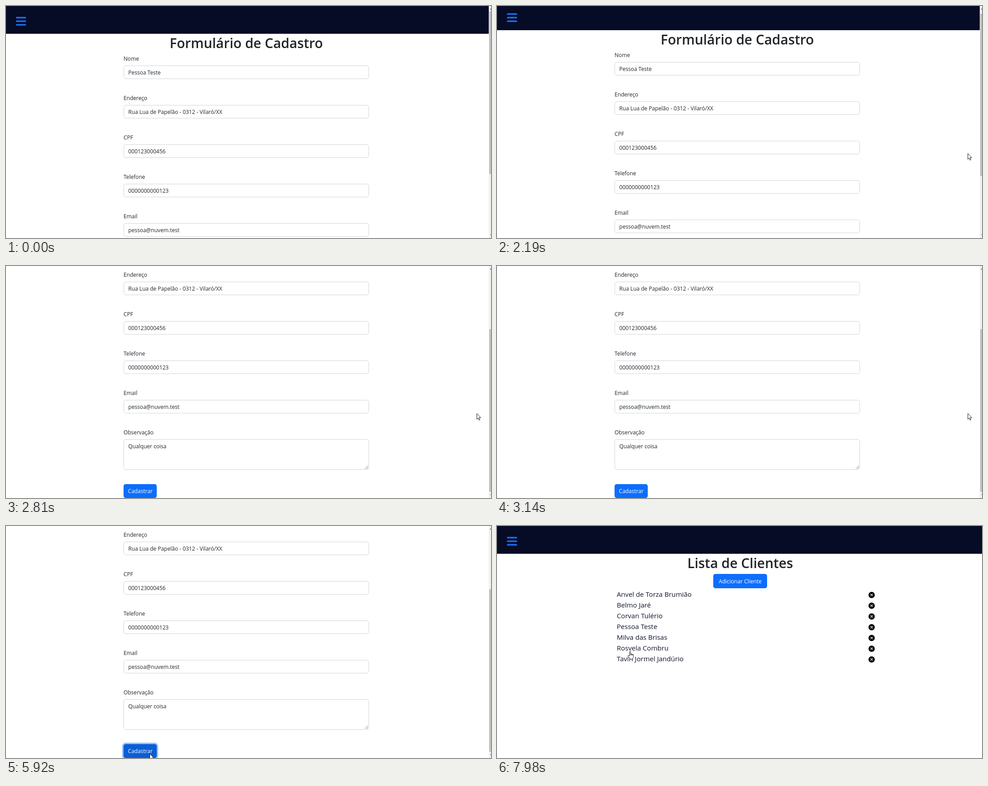
Recreate the animation shown at these times as an HTML page. Size 1081 px wide and 518 px high, loop 8 s.

```html
<!DOCTYPE html>
<html lang="pt-BR">
<head>
<meta charset="utf-8">
<title>Cadastro</title>
<style>
  * { box-sizing: border-box; margin: 0; }
  html, body { width: 100%; height: 100%; overflow: hidden; background: #fff; }
  body {
    position: relative;
    font: 12.1px/19.2px "Open Sans", "Noto Sans", sans-serif;
    color: #212529;
  }
  .view, .page, .cursor { position: absolute; left: 0; top: 0; }
  .view { width: 1081px; height: 518px; overflow: hidden; }
  .view, .page, .thumb, .rows, .cursor, .arrow, .hand {
    animation: 8s step-end infinite;
  }

  nav { height: 62.4px; padding: 24.4px 0 0 22px; background: #060b26; }
  nav svg { display: block; }
  h1 {
    position: relative;
    top: 1.5px;
    height: 38.4px;
    margin-bottom: 6.4px;
    font-size: 30px;
    line-height: 38.4px;
    font-weight: 600;
    text-align: center;
  }
  .btn {
    border-radius: 4.8px;
    background: #0d6efd;
    color: #fff;
    text-align: center;
  }

  /* Form */
  .form { animation-name: form; }
  .page { width: 1076px; animation-name: scroll; }
  .page h1 { width: 1071px; }
  .fields { width: 547px; margin-left: 262px; }
  .fields label { display: block; height: 19.2px; margin-bottom: 6.4px; padding-top: .6px; }
  .box {
    position: relative;
    height: 30.4px;
    margin-bottom: 32px;
    padding: 5.4px 9.6px;
    border: 1px solid #ced4da;
    border-radius: 4.8px;
    white-space: nowrap;
  }
  .area { height: 68.8px; }
  .area svg { position: absolute; right: 0; bottom: 0; }
  .send {
    width: 74.4px;
    height: 30.4px;
    padding-top: 6.1px;
    animation: send 8s linear infinite;
  }
  .bar { position: absolute; left: 1076px; top: 0; width: 5px; height: 518px; background: #f1f1f1; }
  .bar::before, .bar::after {
    content: "";
    position: absolute;
    left: 3px;
    width: 2px;
    height: 1.5px;
    background: #606060;
  }
  .bar::before { top: 6px; }
  .bar::after { top: 509.5px; }
  .thumb {
    position: absolute;
    left: 1px;
    top: 12px;
    width: 4px;
    height: 363px;
    background: #c1c1c1;
    animation-name: thumb;
  }

  /* List */
  .list { animation-name: list; }
  .list h1 { width: 1084px; }
  .add { width: 120px; height: 32px; margin-left: 482px; padding-top: 7px; }
  .rows {
    width: 576px;
    margin-left: 267px;
    padding: 0;
    list-style: none;
    font-size: 15.1px;
    line-height: 24px;
    color: #10142a;
    animation-name: rows;
  }
  .rows li { position: relative; height: 24px; padding-top: .7px; }
  .rows svg { position: absolute; right: 1px; top: 7.5px; }

  /* Pointer */
  .cursor { width: 0; height: 0; animation-name: move; }
  .cursor svg { position: absolute; overflow: visible; fill: #fff; stroke: #000; stroke-width: .9; stroke-linejoin: round; }
  .arrow { animation-name: arrow; }
  .hand { animation-name: hand; }

  @keyframes form { 0% { visibility: visible; } 74.875%, 100% { visibility: hidden; } }
  @keyframes list { 0% { visibility: hidden; } 74.875%, 100% { visibility: visible; } }
  @keyframes rows { 0% { opacity: 0; } 78.25%, 100% { opacity: 1; } }
  @keyframes arrow { 0% { opacity: 1; } 99%, 100% { opacity: 0; } }
  @keyframes hand { 0% { opacity: 0; } 99%, 100% { opacity: 1; } }

  @keyframes scroll {
    0% { transform: none; }
    27.375% { transform: translateY(-8px); }
    28.25% { transform: translateY(-38px); }
    29.125% { transform: translateY(-74px); }
    30% { transform: translateY(-110px); }
    30.875% { transform: translateY(-141px); }
    31.75% { transform: translateY(-172px); }
    32.625%, 100% { transform: translateY(-186px); }
  }
  @keyframes thumb {
    0% { transform: none; }
    27.375% { transform: translateY(5px); }
    28.25% { transform: translateY(26px); }
    29.125% { transform: translateY(51px); }
    30% { transform: translateY(76px); }
    30.875% { transform: translateY(98px); }
    31.75% { transform: translateY(119px); }
    32.625%, 100% { transform: translateY(129px); }
  }
  @keyframes send {
    0%, 61.5% { background: #0d6efd; box-shadow: 0 0 0 3.2px #3184fd00; }
    63.375%, 67.25% { background: #0b5ed7; box-shadow: 0 0 0 3.2px #3184fd00; }
    69% { background: #0a58ca; box-shadow: 0 0 0 3.2px #3184fd80; }
    71%, 100% { background: #0b5ed7; box-shadow: 0 0 0 3.2px #3184fd80; }
  }
  @keyframes move {
    0% { visibility: hidden; transform: translate(1037px, 486px); }
    12.25% { visibility: visible; transform: translate(1037px, 486px); }
    13.125% { transform: translate(1040px, 440px); }
    14% { transform: translate(1045px, 395px); }
    14.875% { transform: translate(1048px, 360px); }
    15.75% { transform: translate(1049px, 340px); }
    16.5% { transform: translate(1049px, 329px); }
    49.25% { transform: translate(930px, 350px); }
    50.125% { transform: translate(760px, 405px); }
    51% { transform: translate(610px, 455px); }
    51.875% { transform: translate(544px, 475px); }
    56.25% { transform: translate(535px, 476px); }
    57.125% { transform: translate(508px, 480px); }
    58% { transform: translate(470px, 485px); }
    58.875% { transform: translate(428px, 491px); }
    59.75% { transform: translate(390px, 497px); }
    60.625% { transform: translate(358px, 502px); }
    61.5% { transform: translate(335px, 506px); }
    62.375% { transform: translate(324px, 507px); }
    63.125% { transform: translate(320px, 508px); }
    96.375% { transform: translate(318px, 480px); }
    97.25% { transform: translate(313px, 425px); }
    98.125% { transform: translate(306px, 360px); }
    99% { transform: translate(299px, 302px); }
    99.75%, 100% { visibility: visible; transform: translate(297px, 279px); }
  }
</style>
</head>
<body>
  <svg width="0" height="0" style="position:absolute">
    <defs>
      <g id="menu" stroke="#1a6fef" stroke-width="3.6" stroke-linecap="round">
        <path d="M1.8 2H21.2M1.8 10H21.2M1.8 18H21.2"/>
      </g>
      <g id="close">
        <circle cx="7" cy="7" r="7"/>
        <path d="M4.9 4.9l4.2 4.2M9.1 4.9l-4.2 4.2" stroke="#fff" stroke-width="1.4" stroke-linecap="round"/>
      </g>
    </defs>
  </svg>

  <section class="view form">
    <div class="page">
      <nav><svg width="23" height="20"><use href="#menu"/></svg></nav>
      <h1>Formulário de Cadastro</h1>
      <div class="fields">
        <label>Nome</label>
        <div class="box">Pessoa Teste</div>
        <label>Endereço</label>
        <div class="box">Rua Lua de Papelão - 0312 - Vilaró/XX</div>
        <label>CPF</label>
        <div class="box">000123000456</div>
        <label>Telefone</label>
        <div class="box">0000000000123</div>
        <label>Email</label>
        <div class="box">pessoa@nuvem.test</div>
        <label>Observação</label>
        <div class="box area">Qualquer coisa
          <svg width="9" height="9" stroke="#666" stroke-width=".9"><path d="M1 8L8 1M5 8L8 5"/></svg>
        </div>
        <div class="btn send">Cadastrar</div>
      </div>
    </div>
    <div class="bar"><div class="thumb"></div></div>
  </section>

  <section class="view list">
    <nav><svg width="23" height="20"><use href="#menu"/></svg></nav>
    <h1>Lista de Clientes</h1>
    <div class="btn add">Adicionar Cliente</div>
    <ul class="rows">
      <li>Anvel de Torza Brumião<svg width="14" height="14"><use href="#close"/></svg></li>
      <li>Belmo Jaré<svg width="14" height="14"><use href="#close"/></svg></li>
      <li>Corvan Tulério<svg width="14" height="14"><use href="#close"/></svg></li>
      <li>Pessoa Teste<svg width="14" height="14"><use href="#close"/></svg></li>
      <li>Milva das Brisas<svg width="14" height="14"><use href="#close"/></svg></li>
      <li>Rosvela Combru<svg width="14" height="14"><use href="#close"/></svg></li>
      <li>Tavin Jormel Jandúrio<svg width="14" height="14"><use href="#close"/></svg></li>
    </ul>
  </section>

  <div class="cursor">
    <svg class="arrow" width="10" height="16"><path d="M.5 .5V13.2L3.4 10.5L5.4 15.2L7.3 14.4L5.3 9.8H9.3Z"/></svg>
    <svg class="hand" width="14" height="19" style="left:-6px">
      <path d="M4.5 11V1.8Q4.6.5 5.7.5T6.9 1.8V6.6Q7.9 5.8 9 7Q10.2 6.3 11 7.6Q12.9 7.2 13 9V12.5Q13 15 11.6 16.4V18.4H5V16.6L1 11.4Q.3 10 1.6 9.5Q2.6 9.3 4.5 11ZM6.9 6.6V9.8M9 7V9.9M11 7.6V10"/>
    </svg>
  </div>
</body>
</html>
```
